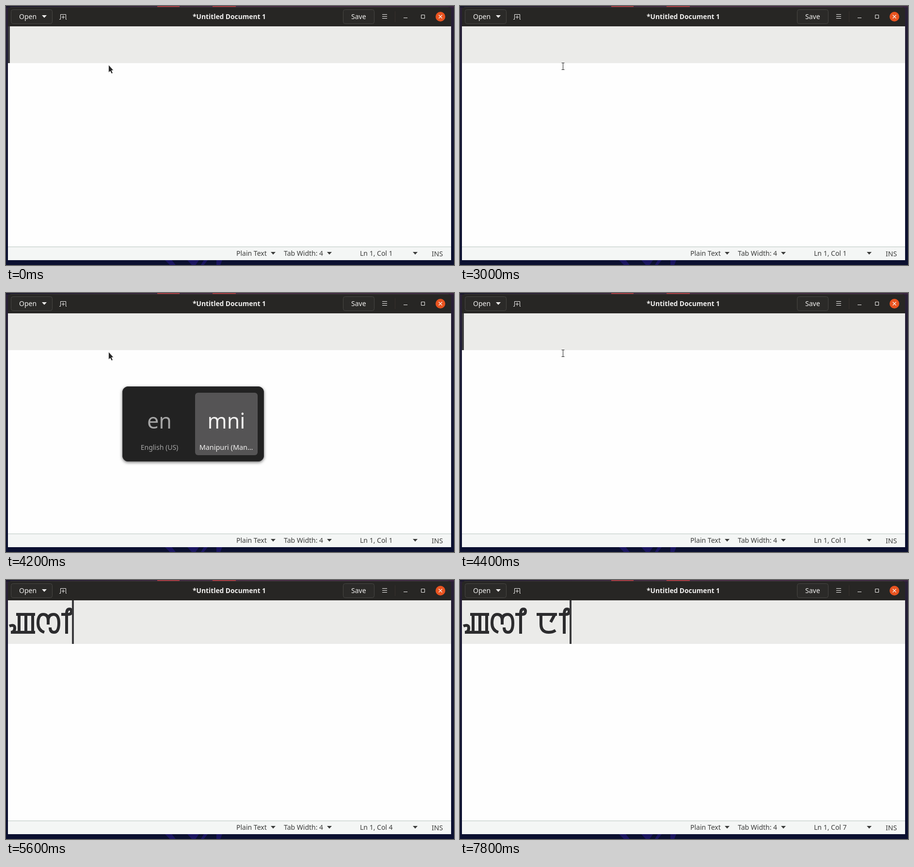
An HTML page that plays this animation: 924 by 535 pixels, repeating every 8000 ms.

```html
<!DOCTYPE html>
<html lang="en">
<head>
<meta charset="utf-8">
<style>
  html, body { margin: 0; width: 100%; height: 100%; overflow: hidden; background: #0b1030; }
  svg { display: block; width: 924px; height: 535px; }
  text { font-family: "Noto Sans", "Open Sans", sans-serif; font-size: 14px; white-space: pre; }
  .light { fill: #f2f1f0; }
  .dim { fill: #a5a5a5; }
  .dark { fill: #3b3c3b; }
  .ink { fill: none; stroke: #2c2c2e; stroke-width: 6; }
  .mini { fill: none; stroke-width: 6; }
  .line { fill: none; stroke: #f2f1f0; }
  .button { fill: #2b2a28; stroke: #474643; }
</style>
</head>
<body>
<svg viewBox="0 0 924 535">
  <defs>
    <linearGradient id="desk" x2="0" y2="1">
      <stop offset="0" stop-color="#2a2036"/><stop offset=".3" stop-color="#191a35"/><stop offset="1" stop-color="#0b1030"/>
    </linearGradient>
    <linearGradient id="rim">
      <stop offset="0" stop-color="#19172c"/><stop offset=".5" stop-color="#4a2a45"/><stop offset="1" stop-color="#3b2540"/>
    </linearGradient>
    <filter id="shadow" x="-10%" y="-10%" width="120%" height="125%">
      <feDropShadow dx="0" dy="2" stdDeviation="3" flood-opacity=".55"/>
    </filter>
    <path id="na" d="M8 71H50M17 71V91Q17 108 33 108Q41 108 47 104M45 72L37 87"/>
    <path id="ngou" d="M7 95Q18 91 18 99Q18 108 10 108H60M21 71H60M27 71V108M41 71V108M55 71V108"/>
    <path id="sam" d="M79 108Q66 104 66 89Q66 71 77 71Q87 71 87 84V92M87 84Q87 71 98 71Q109 71 109 89Q109 108 99 108Q91 108 91 98"/>
    <path id="inap" d="M114 71H125M125 111V70Q125 60 131 60Q135 60 135 65Q135 71 128 71"/>
    <path id="nung" d="M12 82Q24 82 24 74Q24 68 18 68Q12 68 12 75Q12 80 24 78Q24 90 16 94"/>
    <path id="drop" d="M0 0H10L5 5.5Z"/>
  </defs>

  <rect width="924" height="535" fill="url(#desk)"/>
  <rect width="924" height="3" fill="url(#rim)"/>
  <path d="M312 0h46v2h-46zM426 0h48v2h-48z" fill="#a83a44"/>
  <path d="M328 525h14l8 10h-12zM374 525h24l-7 10h-8zM408 525h8l-8 10h-6zM434 525h12l-4 10h-8z" fill="#1a1560"/>

  <path d="M4 42V8Q4 2 10 2H912Q918 2 918 8V42Z" fill="#272624"/>
  <path d="M9 2.5H913" stroke="#3a3936"/>
  <rect class="button" x="10.5" y="7.5" width="85" height="29" rx="4"/>
  <rect class="button" x="695.5" y="7.5" width="64" height="29" rx="4"/>
  <text class="light" x="27" y="27">Open</text>
  <text class="light" x="712" y="27">Save</text>
  <text class="light" x="460.5" y="27" text-anchor="middle" style="font-weight:600;font-size:13.8px">*Untitled Document 1</text>
  <use href="#drop" x="74" y="19" class="light"/>
  <path class="line" d="M110 27.5H112.5V17.5H123.5V27.5H125M118 19.5V26.5M114.5 23H121.5"/>
  <path class="line" d="M776 17.5H786M776 21.5H786M776 25.5H786M820 24.5H828M856.5 18.5H863.5V25.5H856.5Z"/>
  <path d="M802.5 11V33" stroke="#38302d"/>
  <circle cx="896" cy="22" r="10" fill="#e95420"/>
  <path class="line" d="M892.5 18.5L899.5 25.5M899.5 18.5L892.5 25.5" stroke-width="1.3"/>

  <rect x="4" y="42" width="914" height="456" fill="#fefefe"/>
  <rect id="row" x="4" y="42" width="914" fill="#ebebe9"/>
  <rect x="4" y="497" width="914" height="28" fill="#f4f6f5"/>
  <path d="M4 497.5H918" stroke="#b9c6c1"/>
  <g class="dark">
    <text x="475" y="516">Plain Text</text>
    <text x="573" y="516">Tab Width: 4</text>
    <text id="place" x="730" y="516"></text>
    <text x="878" y="517">INS</text>
    <use href="#drop" x="546" y="508"/><use href="#drop" x="662" y="508"/><use href="#drop" x="839" y="508"/>
  </g>

  <text id="latin" x="4" y="102" fill="#2c2c2e" style="font-size:63px"></text>
  <g id="script"></g>
  <rect id="under" y="117" height="3" fill="#2c2c2e"/>
  <rect id="caret" y="42" width="4" fill="#3b3b3d"/>
  <path id="arrow" d="M211.5 121.5V137.5L215 134.5L217.6 139.8L220.4 138.5L217.8 133H222Z" fill="#262626" stroke="#fff" stroke-width=".8"/>
  <g id="beam" fill="none">
    <path d="M209.5 117.5H215.5M212.5 117.5V131.5M209.5 131.5H215.5" stroke="#fff" stroke-width="3"/>
    <path d="M209.5 117.5H215.5M212.5 117.5V131.5M209.5 131.5H215.5" stroke="#222"/>
  </g>
  <g id="list"></g>

  <g id="switcher">
    <rect x="240" y="193" width="292" height="155" rx="12" fill="#202021" filter="url(#shadow)"/>
    <rect x="240.5" y="193.5" width="291" height="154" rx="12" fill="none" stroke="#2f2f30"/>
    <rect id="chosen" y="206" width="129" height="129" rx="6" fill="#555455"/>
    <g id="english" text-anchor="middle">
      <text x="316.5" y="280" style="font-size:43px">en</text>
      <text x="316.5" y="324">English (US)</text>
    </g>
    <g id="manipuri" text-anchor="middle">
      <text x="454.5" y="280" style="font-size:43px">mni</text>
      <text x="454" y="324" style="font-size:14.4px">Manipuri (Man…</text>
    </g>
  </g>
</svg>
<script>
const LOOP = 8000;
const $ = id => document.getElementById(id);
const show = (id, on) => $(id).setAttribute('visibility', on ? 'visible' : 'hidden');
const set = (id, attrs) => Object.entries(attrs).forEach(([k, v]) => $(id).setAttribute(k, v));

const NA_LIST = [['na', ''], ['ngou', 'g'], ['nung', 'gg']];
const NGA_LIST = [['ngou', ''], ['nung', 'g']];
const WORD = [['ngou', 0], ['sam', 0], ['inap', 0]];

// Each step changes part of the state from its time on.
const steps = [
  [0, { row: 76, col: 1, latin: '', script: [], under: null, caret: 4, blink: true, pointer: 'arrow', list: null, layout: '' }],
  [500, { blink: false }],
  [600, { latin: 'n', caret: 43, blink: true, pointer: '' }],
  [700, { col: 2 }],
  [900, { latin: 'ng', caret: 82, col: 3 }],
  [1700, { latin: 'n', caret: 43, col: 2 }],
  [1800, { latin: '', caret: 4, col: 1 }],
  [2700, { blink: false }],
  [3000, { pointer: 'beam' }],
  [3200, { pointer: 'arrow', layout: 'en' }],
  [4200, { layout: 'mni' }],
  [4400, { layout: '', pointer: 'beam', blink: true }],
  [4800, { blink: false }],
  [5000, { row: 90, script: [['na', 0]], under: [6, 52], list: { tip: 52, typed: 'n', rows: NA_LIST } }],
  [5100, { script: [['ngou', 0]], under: [6, 62], pointer: '', list: { tip: 62, typed: 'ng', rows: NGA_LIST } }],
  [5500, { script: WORD.slice(0, 2), under: [62, 113], caret: 112, blink: true, col: 2, list: null }],
  [5600, { script: WORD, under: null, caret: 136, col: 4 }],
  [6000, { blink: false }],
  [6200, { caret: 154, blink: true, col: 5 }],
  [6900, { script: [...WORD, ['na', 150]], under: [156, 201], caret: 200, list: { tip: 202, typed: 'n', rows: NA_LIST } }],
  [7000, { script: [...WORD, ['na', 150], ['inap', 90]], under: null, caret: 226, col: 7, list: null }],
  [7400, { blink: false }],
  [7800, { blink: true }]
];

function candidates({ tip, typed, rows }) {
  const height = 35 + rows.length * 29;
  const items = rows.map(([glyph, rest], i) => {
    const y = 191 + i * 29, mark = glyph === 'nung';
    const color = i ? '#f2f1f0' : '#fff';
    return `<text class="dim" x="14" y="${y}" ${i ? '' : 'style="fill:#f6b79e"'}>F${i + 1}.</text>
      <use href="#${glyph}" class="mini" stroke="${color}"
        transform="translate(${mark ? 36 : 39.5} ${y - (mark ? 30 : 25.5)}) scale(.23)"/>
      <text class="light" x="${mark ? 49 : 58}" y="${y}">${rest}</text>`;
  });
  return `<g transform="translate(${tip - 24})">
    <rect x=".5" y="143" width="80" height="${height}" rx="5" fill="#1f1f20" stroke="#3a3a3b"/>
    <path d="M12 143.5L23.5 132L35 143.5Z" fill="#1f1f20"/>
    <rect x="7" y="171" width="66" height="29" rx="4" fill="#e95420"/>
    <text class="light" x="7" y="164">${typed} (1 / ${rows.length})</text>${items.join('')}</g>`;
}

function draw(s) {
  set('row', { height: s.row });
  set('caret', { x: s.caret, height: s.row });
  show('caret', s.blink);
  $('place').textContent = `Ln 1, Col ${s.col}`;
  $('latin').textContent = s.latin;
  $('script').innerHTML = s.script.map(([g, dx]) => `<use href="#${g}" x="${dx}" class="ink"/>`).join('');
  show('under', s.under);
  if (s.under) set('under', { x: s.under[0], width: s.under[1] - s.under[0] });
  show('arrow', s.pointer === 'arrow');
  show('beam', s.pointer === 'beam');
  $('list').innerHTML = s.list ? candidates(s.list) : '';
  show('switcher', s.layout);
  const english = s.layout === 'en';
  set('chosen', { x: english ? 252 : 390 });
  set('english', { class: english ? 'light' : 'dim' });
  set('manipuri', { class: english ? 'dim' : 'light' });
}

let shown = 0;
function frame(now) {
  const t = now % LOOP;
  const count = steps.filter(([at]) => at <= t).length;
  if (count !== shown) {
    shown = count;
    draw(Object.assign({}, ...steps.slice(0, count).map(step => step[1])));
  }
  requestAnimationFrame(() => frame(performance.now() - start));
}
const start = performance.now();
frame(0);
</script>
</body>
</html>
```
